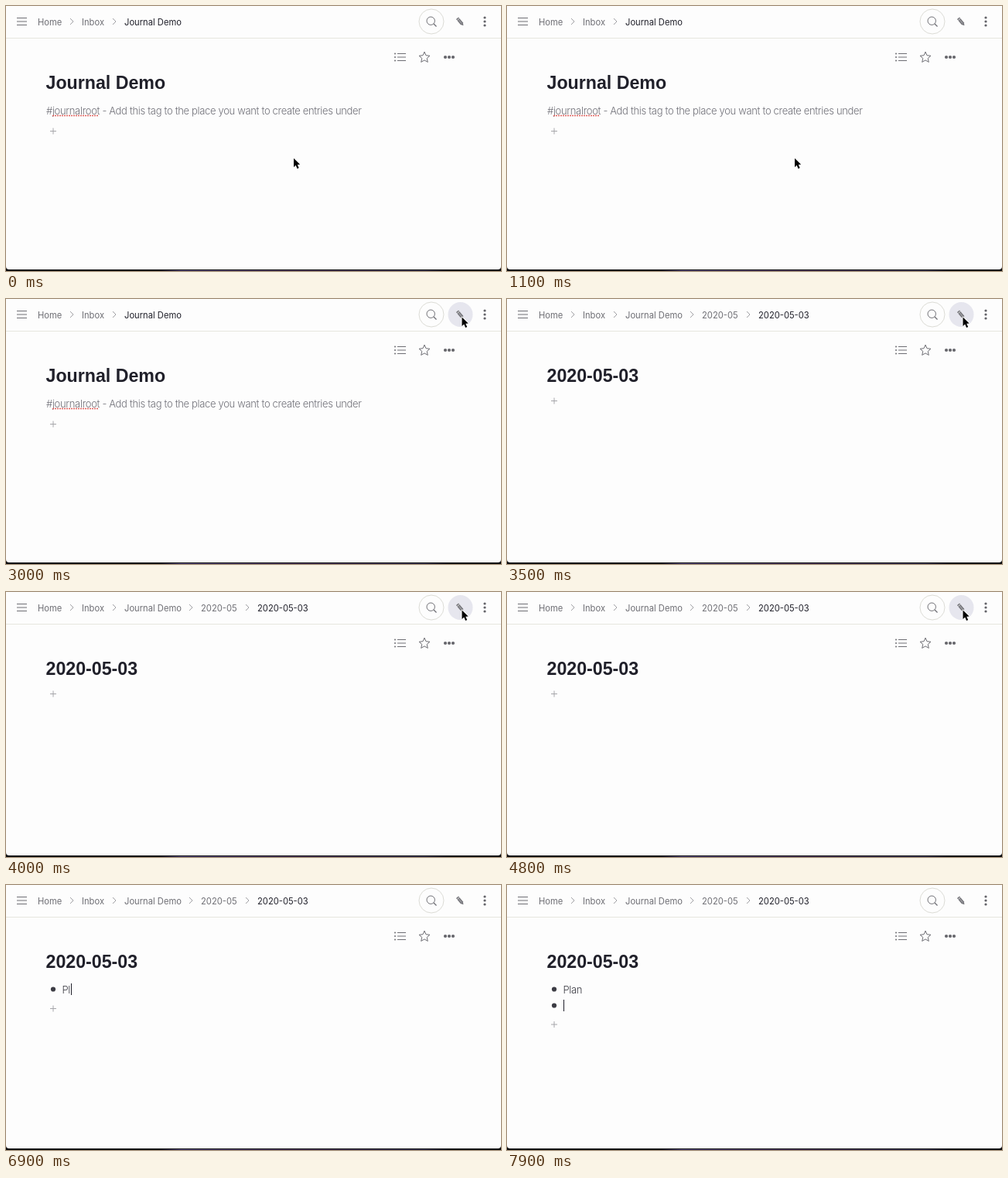
Animation of 640x342 px, one loop 8000 ms. Source, as an HTML page with a canvas:

```html
<!DOCTYPE html>
<html lang="en">
<head>
<meta charset="utf-8">
<title>Journal Demo</title>
<style>
  html, body { margin: 0; width: 100%; height: 100%; overflow: hidden; background: #fdfdfd; }
  canvas { display: block; width: 640px; height: 342px; }
</style>
</head>
<body>
<canvas id="stage" width="640" height="342"></canvas>
<script>
const ctx = document.getElementById('stage').getContext('2d');
const LOOP = 8000;
const PAPER = '#fdfdfd', INK = '#20202a', GREY = '#6e6e74', PALE = '#a6a6aa', BULLET = '#3c3c44';
const FONTS = {
  crumb: '11.2px Inter, sans-serif',
  title: 'bold 23.2px "Liberation Sans", Arial, sans-serif',
  body: '300 13px Inter, sans-serif'
};
const BODY_SPACING = -0.33;

// Key moments in ms
const HOVER_IN = 2150, PAGE_OPENS = 3500, HOVER_OUT = 5200;
const TITLE_FOCUS = 5300, FIRST_ITEM = 6200, SECOND_ITEM = 7500;
const KEY_TIMES = [6650, 6800, 6950, 7100];

// Pointer stops: time, x, y
const POINTER = [
  [1150, 372, 196.5], [1950, 590.5, 31.5], [2400, 589.5, 23.5], [5050, 589.5, 23.5], [5700, 566, 40.5]
];

function text(str, x, y, font, color, spacing = 0) {
  ctx.font = FONTS[font];
  ctx.letterSpacing = spacing + 'px';
  ctx.fillStyle = color;
  ctx.fillText(str, x, y);
}

function dot(x, y, r, color) {
  ctx.fillStyle = color;
  ctx.beginPath();
  ctx.arc(x, y, r, 0, Math.PI * 2);
  ctx.fill();
}

function ring(x, y, r, color, dash = []) {
  ctx.strokeStyle = color;
  ctx.lineWidth = 1;
  ctx.setLineDash(dash);
  ctx.beginPath();
  ctx.arc(x, y, r, 0, Math.PI * 2);
  ctx.stroke();
  ctx.setLineDash([]);
}

function stroke(points, color, width = 1, dash = []) {
  ctx.strokeStyle = color;
  ctx.lineWidth = width;
  ctx.setLineDash(dash);
  ctx.beginPath();
  points.forEach(([x, y]) => ctx.lineTo(x, y));
  ctx.stroke();
  ctx.setLineDash([]);
}

function polygon(points) {
  ctx.beginPath();
  points.forEach(([x, y]) => ctx.lineTo(x, y));
  ctx.closePath();
}

function drawWindow() {
  ctx.fillStyle = '#0c0c0e';
  ctx.fillRect(0, 330, 640, 12);
  const strip = ctx.createLinearGradient(195, 0, 580, 0);
  strip.addColorStop(0, '#0c0c0e');
  strip.addColorStop(0.08, '#54487c');
  strip.addColorStop(0.5, '#4c3458');
  strip.addColorStop(0.9, '#383452');
  strip.addColorStop(1, '#0c0c0e');
  ctx.fillStyle = strip;
  ctx.fillRect(195, 341, 385, 1);
  ctx.fillStyle = PAPER;
  ctx.beginPath();
  ctx.roundRect(0, -10, 640, 350, 4);
  ctx.fill();
  stroke([[0, 41.5], [640, 41.5]], '#e6e6de');
}

function drawCrumbs(opened) {
  const crumbs = [['Home', 41], ['Inbox', 98], ['Journal Demo', 153]];
  if (opened) crumbs.push(['2020-05', 252], ['2020-05-03', 325]);
  crumbs.forEach(([label, x], i) => {
    text(label, x, 24.5, 'crumb', i === crumbs.length - 1 ? INK : GREY);
    if (i) {
      const c = x - 13;
      stroke([[c - 2, 16], [c + 2, 20], [c - 2, 24]], '#a0a0a4');
    }
  });
}

function drawPencil() {
  ctx.save();
  ctx.translate(587.3, 20.3);
  ctx.rotate(Math.PI * 0.28);
  ctx.fillStyle = '#77777c';
  polygon([[-6, -2], [3, -2], [6.5, 0], [3, 2], [-6, 2]]);
  ctx.fill();
  stroke([[-4, -2], [-4, 2]], PAPER, 0.7);
  stroke([[-3, 0], [3, 0]], '#c0c0c4', 0.7);
  ctx.restore();
}

function drawIcons(hover) {
  for (const y of [15.5, 20, 24.5]) stroke([[14, y], [27, y]], GREY);

  ring(550, 20, 16, '#dcdcd6');
  ring(549.2, 19.2, 5.2, GREY);
  stroke([[553, 23], [556.5, 26.5]], GREY, 1.2);

  if (hover) dot(587.5, 20, 16, '#e6e6ee');
  drawPencil();
  for (const y of [15, 20, 25]) dot(619, y, 1.6, '#626268');

  for (const y of [61.5, 66, 70.5]) {
    dot(503, y, 1, GREY);
    stroke([[506, y], [517, y]], GREY);
  }
  const star = Array.from({ length: 10 }, (_, i) => {
    const a = -Math.PI / 2 + i * Math.PI / 5, r = i % 2 ? 3.4 : 7.3;
    return [541 + r * Math.cos(a), 66.5 + r * Math.sin(a)];
  });
  polygon(star);
  ctx.strokeStyle = GREY;
  ctx.lineWidth = 1;
  ctx.stroke();
  for (const x of [568, 573, 578]) dot(x, 66, 2.1, '#66666c');
}

function drawPlus(y) {
  stroke([[57, y], [65, y]], PALE);
  stroke([[61, y - 4], [61, y + 4]], PALE);
}

function drawCaret(x, top, bottom) {
  stroke([[x, top], [x, bottom]], INK);
}

function drawRootPage() {
  text('Journal Demo', 51.5, 107, 'title', INK);
  text('#journalroot - Add this tag to the place you want to create entries under',
    52, 140, 'body', '#707078', BODY_SPACING);
  stroke([[60, 141.5], [120, 141.5]], '#e0605c', 1.6, [2, 1]);
  drawPlus(161.5);
}

function drawEntryPage(t) {
  text('2020-05-03', 51.5, 107, 'title', INK);
  if (t < FIRST_ITEM) {
    drawPlus(131.5);
    if (t >= TITLE_FOCUS) drawCaret(173.5, 85, 111);
    return;
  }
  const typed = 'Plan'.slice(0, KEY_TIMES.filter(k => t >= k).length);
  dot(61, 134.5, 3.1, BULLET);
  text(typed, 72.5, 140, 'body', '#3a3a42', BODY_SPACING);
  if (t < SECOND_ITEM) {
    drawCaret(73.5 + Math.round(ctx.measureText(typed).width), 127, 142);
    drawPlus(159.5);
  } else {
    dot(61, 155.5, 3.1, BULLET);
    drawCaret(73.5, 148, 163);
    drawPlus(180);
  }
}

function pointerAt(t) {
  const next = POINTER.findIndex(p => t < p[0]);
  if (next === 0) return POINTER[0].slice(1);
  if (next < 0) return POINTER[POINTER.length - 1].slice(1);
  const [t0, x0, y0] = POINTER[next - 1], [t1, x1, y1] = POINTER[next];
  const u = (t - t0) / (t1 - t0), e = u * u * (3 - 2 * u);
  return [x0 + (x1 - x0) * e, y0 + (y1 - y0) * e];
}

function drawPointer(t) {
  if (t >= FIRST_ITEM) return;
  ctx.save();
  ctx.translate(...pointerAt(t));
  ctx.scale(0.88, 0.88);
  polygon([[0, 0], [0, 13], [3, 10.3], [5.2, 15.2], [7.6, 14.1], [5.4, 9.4], [9.3, 9.2]]);
  ctx.lineJoin = 'round';
  ctx.strokeStyle = '#ffffff';
  ctx.lineWidth = 2;
  ctx.stroke();
  ctx.fillStyle = '#000000';
  ctx.fill();
  ctx.restore();
}

function draw(now) {
  const t = now % LOOP, opened = t >= PAGE_OPENS;
  drawWindow();
  drawCrumbs(opened);
  drawIcons(t >= HOVER_IN && t < HOVER_OUT);
  if (opened) drawEntryPage(t);
  else drawRootPage();
  drawPointer(t);
}

let start;
function tick(now) {
  start ??= now;
  draw(now - start);
  requestAnimationFrame(tick);
}
draw(0);
requestAnimationFrame(tick);
</script>
</body>
</html>
```
